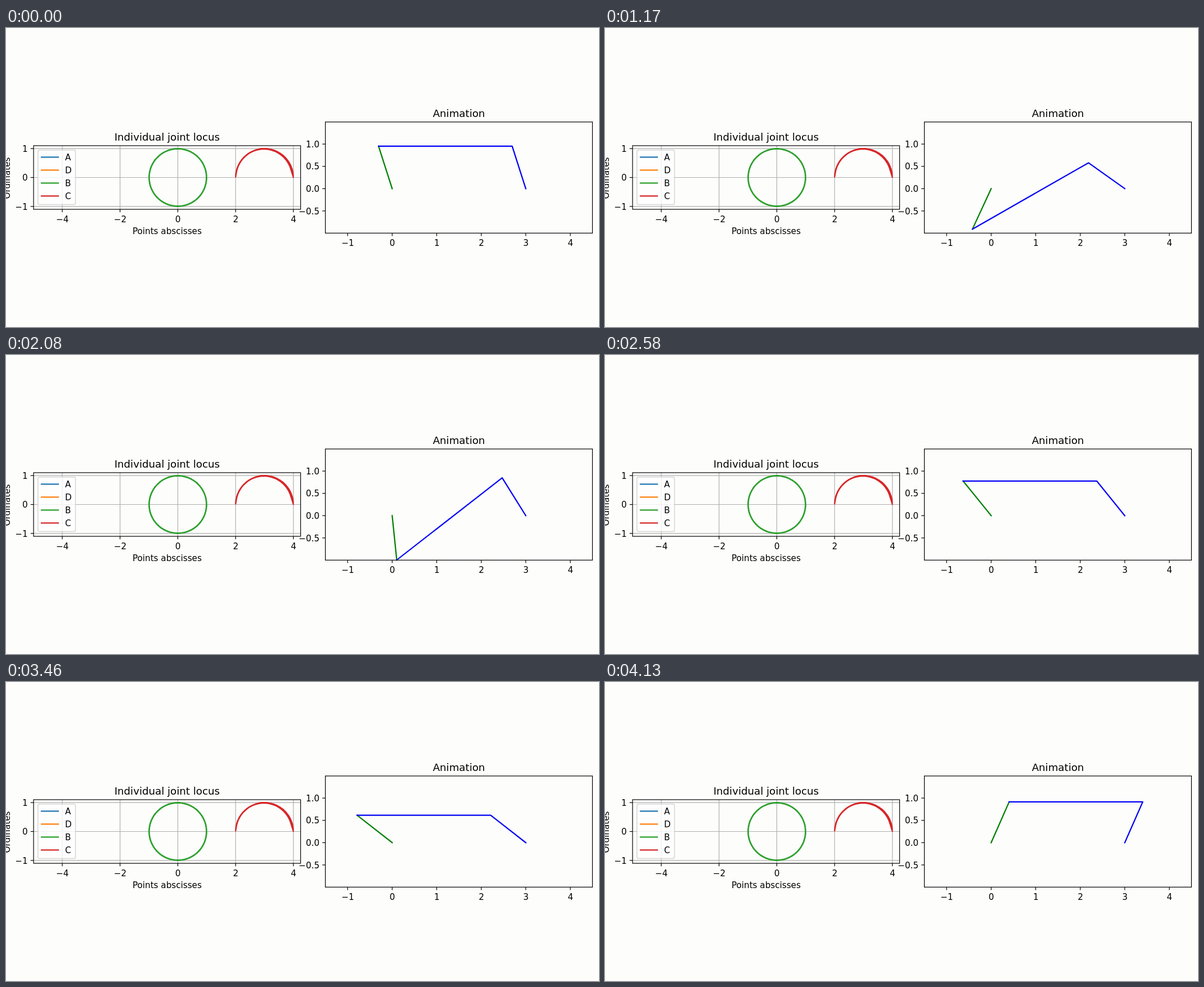
Animation, 1054 px wide and 531 px high, one loop 4180 ms. Source, as an HTML page:

```html
<!DOCTYPE html>
<html lang="en">
<head>
<meta charset="utf-8">
<title>Four-bar linkage</title>
<style>
  html, body { margin: 0; width: 100%; height: 100%; overflow: hidden; background: #fdfdfc; }
  svg { display: block; width: 1054px; height: 531px; }
  text { font: 15.2px "DejaVu Sans", sans-serif; fill: #000; }
  .title { font-size: 18.2px; }
  .frame { fill: none; stroke: #000; stroke-width: 1.2; }
  .grid { stroke: #b0b0b0; stroke-width: 1.2; }
  .curve { fill: none; stroke-width: 2.25; stroke-linejoin: round; stroke-linecap: square; }
</style>
</head>
<body>
<svg id="stage" viewBox="0 0 1054 531"></svg>
<script>
const stage = document.getElementById('stage');
const LOOP = 4180, FRAMES = 100;
const START = 107.8 * Math.PI / 180, STEP = 0.31;

function add(tag, attrs, content = '') {
  const node = document.createElementNS('http://www.w3.org/2000/svg', tag);
  for (const name in attrs) node.setAttribute(name, attrs[name]);
  node.textContent = content;
  return stage.appendChild(node);
}

const label = (x, y, content, anchor = 'middle', extra = {}) =>
  add('text', { x, y, 'text-anchor': anchor, ...extra }, content);

const segment = (x1, y1, x2, y2, cls) => add('line', { x1, y1, x2, y2, class: cls });

const curve = (color, points = '') => add('polyline', { class: 'curve', stroke: color, points });

// Joint positions for one crank angle; the rocker always stays in the upper half.
function joints(angle) {
  const B = [Math.cos(angle), Math.sin(angle)];
  const rocker = B[1] >= 0 ? angle : 2 * Math.atan(-2 * Math.tan(angle / 2));
  return { A: [0, 0], B, C: [3 + Math.cos(rocker), Math.sin(rocker)], D: [3, 0] };
}

function makePlot(box, origin, unit) {
  const { left, top, right, bottom } = box;
  const px = x => origin[0] + unit * x;
  const py = y => origin[1] - unit * y;
  const toPoints = list => list.map(([x, y]) => `${px(x).toFixed(2)},${py(y).toFixed(2)}`).join(' ');

  function drawGrid(xs, ys) {
    xs.forEach(x => segment(px(x), top, px(x), bottom, 'grid'));
    ys.forEach(y => segment(left, py(y), right, py(y), 'grid'));
  }
  function drawAxes(xs, ys, digits) {
    const format = (v, d) => v.toFixed(d).replace('-', '\u2212');
    xs.forEach(x => {
      segment(px(x), bottom, px(x), bottom + 5.3, 'frame');
      label(px(x) + 0.3, bottom + 22.6, format(x, 0));
    });
    ys.forEach(y => {
      segment(left - 5.3, py(y), left, py(y), 'frame');
      label(left - 10.4, py(y) + 5.7, format(y, digits), 'end');
    });
    add('rect', { x: left, y: top, width: right - left, height: bottom - top, class: 'frame' });
  }
  return { toPoints, drawGrid, drawAxes };
}

// Left: joint loci
const locus = makePlot({ left: 49, top: 209, right: 523.6, bottom: 322 }, [305.4, 265.5], 51.35);
const xTicks = [-4, -2, 0, 2, 4], yTicks = [-1, 0, 1];
const poses = Array.from({ length: FRAMES }, (_, k) => joints(START + STEP * k));
locus.drawGrid(xTicks, yTicks);
curve('#2ca02c', locus.toPoints(poses.map(p => p.B)));
curve('#d62728', locus.toPoints(poses.map(p => p.C)));
locus.drawAxes(xTicks, yTicks, 0);
label(286.3, 199.5, 'Individual joint locus', 'middle', { class: 'title' });
label(286.4, 366, 'Points abscisses');
label(0, 0, 'Ordinates', 'middle', { transform: 'translate(7 266.5) rotate(-90)' });

add('rect', { x: 56.7, y: 216.8, width: 66.8, height: 96.6, rx: 3, fill: '#fff', 'fill-opacity': 0.8,
  stroke: '#ccc', 'stroke-opacity': 0.8, 'stroke-width': 1.5 });
[['A', '#1f77b4'], ['D', '#ff7f0e'], ['B', '#2ca02c'], ['C', '#d62728']].forEach(([name, color], i) => {
  const y = 229.4 + 23 * i;
  curve(color, `63,${y} 93,${y}`);
  label(105, y + 5.5, name, 'start');
});

// Right: moving linkage
const linkage = makePlot({ left: 567.6, top: 166.9, right: 1042.4, bottom: 364.3 }, [686.4, 285.3], 79.15);
const crank = curve('#008000');
const arms = curve('#0000f5');
linkage.drawAxes([-1, 0, 1, 2, 3, 4], [-0.5, 0, 0.5, 1], 1);
label(805, 157.5, 'Animation', 'middle', { class: 'title' });

// 24 pictures per second, each start rounded to 10 ms
const starts = poses.map((_, k) => Math.round(k * 12.5 / 3) * 10);

function render(time) {
  const t = time % LOOP;
  const { A, B, C, D } = poses[starts.filter(s => s <= t).length - 1];
  crank.setAttribute('points', linkage.toPoints([A, B]));
  arms.setAttribute('points', linkage.toPoints([B, C, D]));
}

const begin = performance.now();
function tick() {
  render(performance.now() - begin);
  requestAnimationFrame(tick);
}
tick();
</script>
</body>
</html>
```
